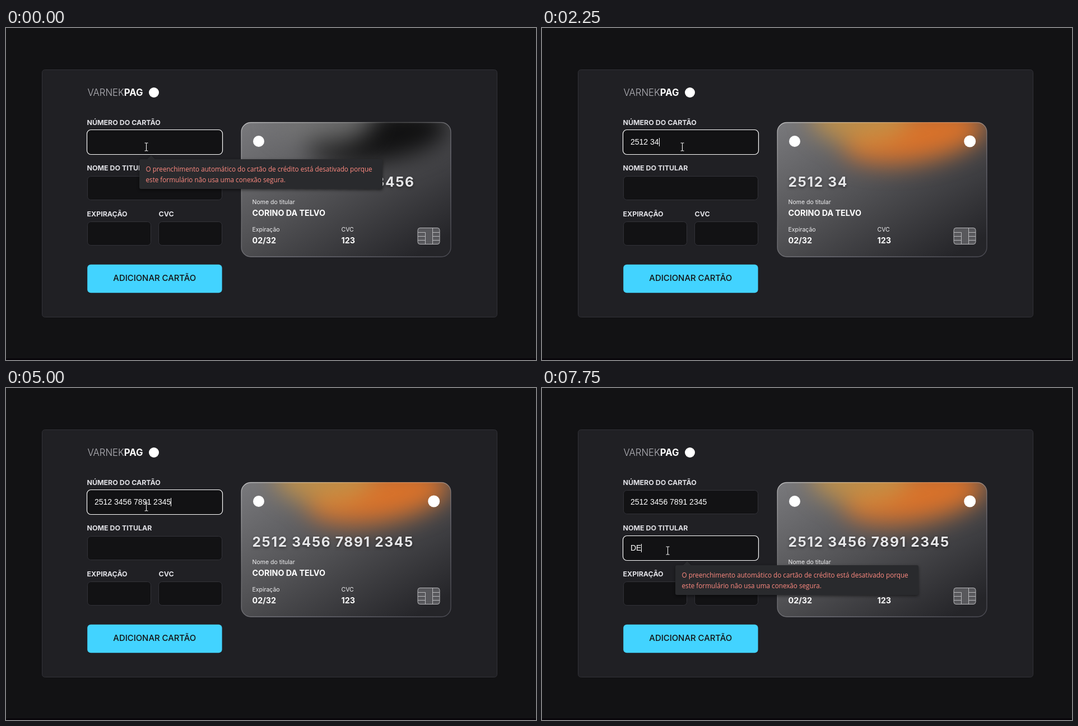
An HTML page for the animation above (8 s loop, 946 by 592 pixels).

```html
<!DOCTYPE html>
<html lang="pt-BR">
<head>
<meta charset="utf-8">
<title>Cartão</title>
<style>
html, body { margin: 0; height: 100%; overflow: hidden; background: #121214; }
svg { display: block; width: 946px; height: 592px; font-family: Inter, sans-serif; fill: #fff; }
.label { font-size: 12.4px; font-weight: 700; fill: #e1e1e6; }
.field { fill: #121214; stroke: #323238; }
.focus { fill: #121214; stroke: #fff; stroke-width: 1.2; }
.typed { font: 14px "Liberation Sans", Arial, sans-serif; }
.small { font-size: 10.5px; fill: #f0f0f2; }
.value { font-size: 14.3px; font-weight: 700; }
.number { font-size: 24.5px; font-weight: 700; letter-spacing: 1.65px; fill: #e6e6e8; }
.tip { font: 11.7px "Open Sans", "Noto Sans", sans-serif; fill: #ff8a80; }
filter { color-interpolation-filters: sRGB; }
</style>
</head>
<body>
<svg viewBox="0 0 946 592">
  <defs>
    <linearGradient id="base" gradientUnits="userSpaceOnUse" x1="470" y1="150" x2="655" y2="455">
      <stop stop-color="#77777a"/>
      <stop offset=".5" stop-color="#505053"/>
      <stop offset="1" stop-color="#252529"/>
    </linearGradient>
    <linearGradient id="edge" x1="0" y1="0" x2="1" y2="1">
      <stop stop-color="#fff" stop-opacity=".55"/>
      <stop offset=".35" stop-color="#fff" stop-opacity=".18"/>
      <stop offset=".6" stop-color="#a8a8b8" stop-opacity=".5"/>
      <stop offset="1" stop-color="#a8a8b8" stop-opacity=".3"/>
    </linearGradient>
    <filter id="blur" x="-50%" y="-100%" width="200%" height="300%"><feGaussianBlur stdDeviation="21"/></filter>
    <filter id="shadow" x="-10%" y="-30%" width="120%" height="160%">
      <feDropShadow dx="0" dy="2" stdDeviation="2.5" flood-opacity=".5"/>
    </filter>
    <clipPath id="cardClip"><rect x="420" y="168" width="374" height="240" rx="17"/></clipPath>
  </defs>

  <rect y="589" width="946" height="3" fill="#09060b"/>
  <rect x="64.5" y="74.5" width="812" height="441" rx="5" fill="#202024" stroke="#323238"/>

  <text x="145.5" y="120.5" font-size="16.7" font-weight="300" fill="#b4b4ba">VARNEK<tspan font-weight="700" fill="#fff">PAG</tspan></text>
  <circle cx="264" cy="115" r="9"/>

  <text class="label" x="144.5" y="173">NÚMERO DO CARTÃO</text>
  <text class="label" x="144.5" y="254">NOME DO TITULAR</text>
  <text class="label" x="144.5" y="335.5">EXPIRAÇÃO</text>
  <text class="label" x="272.5" y="335.5">CVC</text>
  <rect class="field" x="145.5" y="182.5" width="240" height="42" rx="6"/>
  <rect class="field" x="145.5" y="264.5" width="240" height="42" rx="6"/>
  <rect class="field" x="145.5" y="345.5" width="113" height="42" rx="6"/>
  <rect class="field" x="272.5" y="345.5" width="113" height="42" rx="6"/>
  <rect class="focus" id="focus" x="144.5" y="181.5" width="242" height="44" rx="7"/>
  <text class="typed" id="numberField" x="158" y="208"></text>
  <text class="typed" id="nameField" x="158" y="290"></text>
  <rect id="caret" y="196" width="1" height="15"/>

  <rect x="145.2" y="421.7" width="240.4" height="50.6" rx="6" fill="#42d3ff"/>
  <text x="265.3" y="451.3" text-anchor="middle" font-size="14.9" font-weight="500" fill="#121214">ADICIONAR CARTÃO</text>

  <g clip-path="url(#cardClip)">
    <rect x="420" y="168" width="374" height="240" fill="url(#base)"/>
    <g filter="url(#blur)">
      <ellipse id="blobA" cx="664" cy="192" rx="128" ry="47" transform="rotate(-9 664 192)"/>
      <ellipse id="blobB" cx="568" cy="158" rx="88" ry="50" opacity=".85"/>
    </g>
  </g>
  <rect x="420" y="168.5" width="374" height="239.5" rx="17" fill="none" stroke="url(#edge)" stroke-width="1.3"/>
  <circle cx="451" cy="202" r="10"/>
  <circle id="network" cx="763.7" cy="202" r="10.5"/>
  <text class="number" id="cardNumber" x="439.5" y="283" filter="url(#shadow)"></text>
  <text class="small" x="439.5" y="313.5">Nome do titular</text>
  <text class="value" id="cardName" x="439.5" y="334.5"></text>
  <text class="small" x="439.5" y="363">Expiração</text>
  <text class="value" x="439.5" y="384">02/32</text>
  <text class="small" x="598.5" y="363">CVC</text>
  <text class="value" x="598.5" y="384">123</text>
  <g fill="#58585c" stroke="#b9b9bc">
    <rect x="735" y="356.5" width="39" height="29" rx="4"/>
    <path fill="none" d="M735 364.5h13.5v21M735 371.5h13.5M735 378.5h13.5M761.5 356.5v29M761.5 364.5h12.5M761.5 371.5h12.5M761.5 378.5h12.5"/>
  </g>

  <g id="tip">
    <path d="M252 234l7-7 7 7h403a3 3 0 0 1 3 3v47a3 3 0 0 1-3 3h-428a3 3 0 0 1-3-3v-47a3 3 0 0 1 3-3z" fill="#292a2d" filter="url(#shadow)"/>
    <text class="tip" x="249.5" y="256">O preenchimento automático do cartão de crédito está desativado porque</text>
    <text class="tip" x="249.5" y="274.5">este formulário não usa uma conexão segura.</text>
  </g>

  <path id="pointer" d="M-3-7h2.2L0-6.2.8-7H3M0-6.5v13M-3 7h2.2L0 6.2.8 7H3" fill="none" stroke="#f2f2f2" stroke-width="1.1"/>
</svg>
<script>
const LOOP = 8000;
const NUMBER = '2512 3456 7891 2345';
const byId = id => document.getElementById(id);

// Each track lists [start in ms, value]; a value holds until the next start.
const tracks = {
  numberLength: [[0, 0], [500, 1], [1000, 2], [1750, 3], [2000, 6], [2250, 7], [2500, 8], [2750, 9],
    [3000, 11], [3250, 12], [3500, 13], [4500, 16], [4750, 17], [5000, 19]],
  nameLength: [[0, 0], [7500, 1], [7750, 2]],
  caret: [[0, 0], [500, 1], [1500, 0], [1750, 1], [4000, 0], [4500, 1], [5750, 0], [6000, 1],
    [6500, 0], [6750, 1], [7250, 0], [7500, 1]],
  tip: [[0, 1], [500, 0], [750, 1], [2000, .5], [2250, 0], [6750, 1], [7500, 0], [7750, 1]],
  pointer: [[0, '250.5 212'], [6250, '236.5 265'], [6500, '228.5 291'], [7250, '224.5 290']]
};
const at = (track, t) => tracks[track].findLast(([start]) => start <= t)[1];

function draw(t) {
  const number = NUMBER.slice(0, at('numberLength', t));
  const name = 'DE'.slice(0, at('nameLength', t));
  const onName = t >= 6750;
  const known = number.length > 1;
  const shift = `translate(0 ${onName ? 82 : 0})`;

  byId('numberField').textContent = number;
  byId('nameField').textContent = name;
  byId('cardNumber').textContent = number || '1234 5678 9012 3456';
  byId('cardName').textContent = name || 'CORINO DA TELVO';

  byId('blobA').setAttribute('fill', known ? '#df7329' : '#000');
  byId('blobB').setAttribute('fill', known ? '#c69347' : '#747474');
  byId('blobA').setAttribute('opacity', known ? .95 : .8);
  byId('network').setAttribute('opacity', +known);

  const field = byId(onName ? 'nameField' : 'numberField');
  byId('caret').setAttribute('x', Math.round(158 + field.getComputedTextLength()));
  byId('caret').setAttribute('opacity', at('caret', t));
  byId('tip').setAttribute('opacity', at('tip', t));
  for (const id of ['focus', 'caret', 'tip']) byId(id).setAttribute('transform', shift);
  byId('pointer').setAttribute('transform', `translate(${at('pointer', t)})`);
}

const begin = performance.now();
function frame() {
  draw((performance.now() - begin) % LOOP);
  requestAnimationFrame(frame);
}
frame();
</script>
</body>
</html>
```
